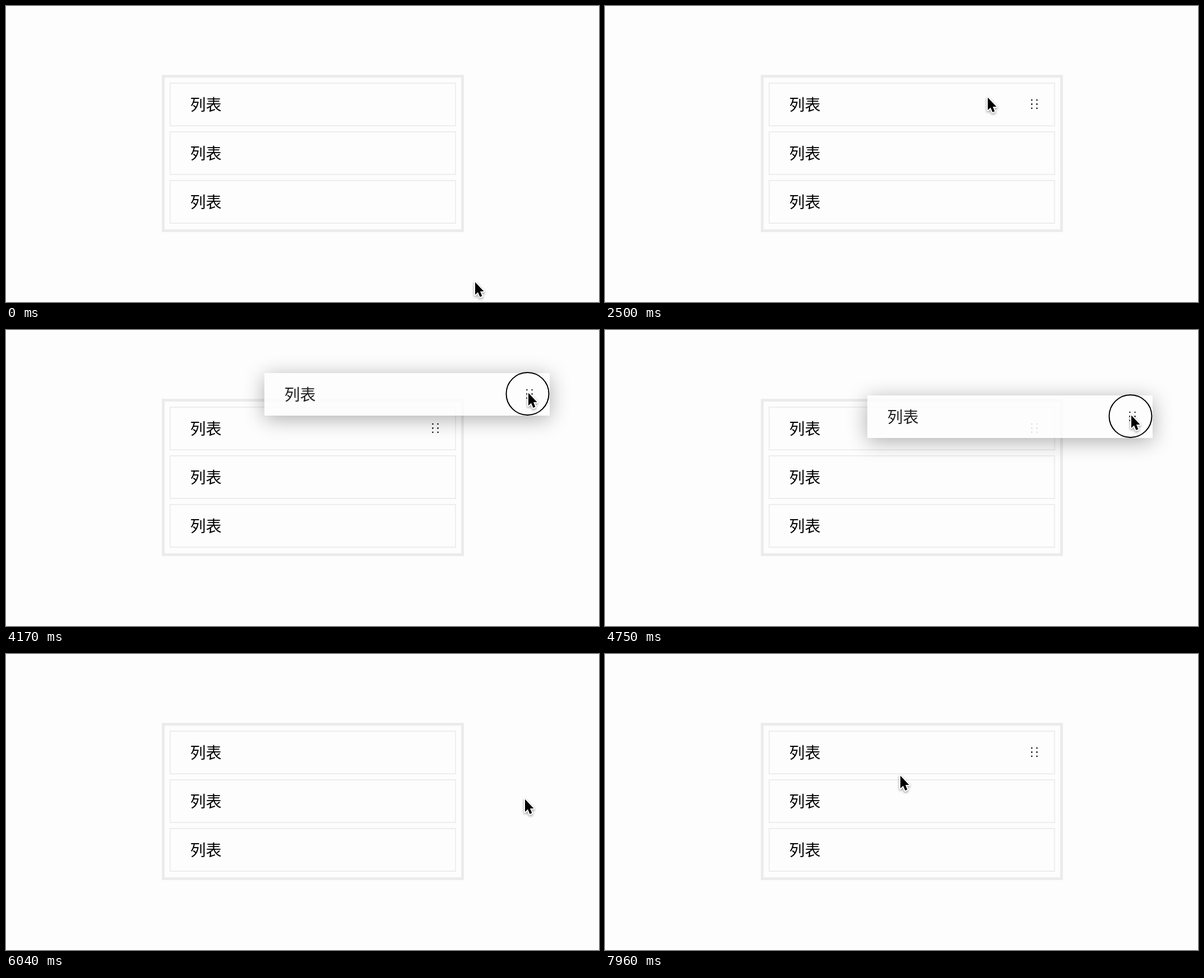
An HTML page with a canvas for the animation above (8 s loop, 1058 by 529 pixels).

```html
<!DOCTYPE html>
<html lang="zh">
<head>
<meta charset="utf-8">
<title>列表</title>
<style>
html, body { margin: 0; width: 100%; height: 100%; overflow: hidden; background: #fdfdfd; }
canvas { display: block; }
</style>
</head>
<body>
<canvas id="stage" width="1058" height="529"></canvas>
<script>
const ctx = document.getElementById('stage').getContext('2d');
const LOOP = 8000;
const ROW = { x: 292, y: 137, w: 511, h: 78, step: 87 };
const PRESS = 2900, LIFT = 3400, DROP = 5400, HOME = 5820, LEAVE = 5900;

const clamp = v => Math.min(1, Math.max(0, v));
const span = (t, a, b) => clamp((t - a) / (b - a));
const ease = u => u * u * (3 - 2 * u);

// An eased move to a point, curved when a control point is given
const move = (from, till, to, bend) => ({ from, till, to, bend });

function follow(start, moves, t) {
  let p = start;
  for (const { from, till, to, bend = [0, 1].map(k => (p[k] + to[k]) / 2) } of moves) {
    if (t < from) break;
    const u = ease(span(t, from, till)), v = 1 - u;
    const next = p.map((a, k) => a * v * v + 2 * u * v * bend[k] + to[k] * u * u);
    if (t < till) return next;
    p = to;
  }
  return p;
}

const approach = [
  move(680, 1670, [622, 219], [655, 430]),
  move(1880, 2880, [764, 173], [612, 139])
];
const carry = [
  move(LIFT, 4170, [168, -61], [60, 230]),
  move(4170, 4750, [175, -21], [172, -105]),
  move(4750, 5250, [162, 82], [170, 20]),
  move(DROP, HOME, [0, 0])
];
const wander = [
  move(6080, 6540, [690, 264]),
  move(6680, 7600, [549, 130], [600, 190]),
  move(7600, 7750, [534, 177]),
  move(7880, 7960, [527, 217])
];

const cardAt = t => follow([0, 0], carry, t);

function cursorAt(t) {
  if (t < LIFT) return follow([837, 493], approach, t);
  if (t >= DROP) return follow([926, 259], wander, t);
  const [x, y] = cardAt(t), slip = 4 * ease(span(t, 4750, 5250));
  return [x + 764, y + 173 + slip];
}

function hoverRow(t, [x, y]) {
  if (t >= LIFT && t < LEAVE) return 0;
  if (x < 292 || x > 803 || y < 123 || y > 392) return -1;
  return Math.max(0, Math.floor((y - 131) / ROW.step));
}

function frame(x, y, w, h, line) {
  ctx.strokeStyle = '#ebebeb';
  ctx.lineWidth = line;
  ctx.strokeRect(x + line / 2, y + line / 2, w - line, h - line);
}

function label(x, y) {
  ctx.fillStyle = '#000';
  ctx.font = '28px "Noto Sans CJK SC", "Noto Sans CJK", "Noto Sans CJK JP", sans-serif';
  ctx.fillText('列表', x + 36.5, y + 50);
}

function handle(x, y) {
  ctx.fillStyle = '#000';
  for (let i = 0; i < 6; i++) {
    ctx.beginPath();
    ctx.arc(x + 469.4 + (i % 2) * 9.2, y + 31 + (i >> 1) * 7.4, 1.3, 0, 7);
    ctx.fill();
  }
}

function card([dx, dy]) {
  const x = 293 + dx, y = 138 + dy, w = 509, h = 76;
  // Shadow only outside, so the rows show faintly through the card
  ctx.save();
  ctx.beginPath();
  ctx.rect(0, 0, 1058, 529);
  ctx.rect(x, y, w, h);
  ctx.clip('evenodd');
  ctx.shadowColor = 'rgba(0,0,0,.32)';
  ctx.shadowBlur = 36;
  ctx.shadowOffsetY = 6;
  ctx.fillStyle = '#000';
  ctx.fillRect(x, y, w, h);
  ctx.restore();
  ctx.save();
  ctx.globalAlpha = 0.88;
  ctx.fillStyle = '#fdfdfd';
  ctx.fillRect(x, y, w, h);
  label(x - 1, y - 1);
  handle(x - 1, y - 1);
  ctx.restore();
}

function ring(t, [x, y]) {
  const grow = span(t, PRESS, PRESS + 300), leave = span(t, DROP, DROP + 280);
  ctx.save();
  ctx.globalAlpha = clamp(grow * 1.5) * (1 - leave);
  ctx.strokeStyle = '#000';
  ctx.lineWidth = 2;
  ctx.beginPath();
  ctx.arc(x - 1.5, y + 2, 38 + 18 * ((1 - grow) ** 2 + leave ** 2), 0, 7);
  ctx.stroke();
  ctx.restore();
}

const arrow = new Path2D('M0 0V22.6L5 18L8.6 26.4L12.4 24.8L9 16.6H15.6Z');

function pointer([x, y]) {
  ctx.save();
  ctx.translate(x, y + 0.5);
  ctx.lineJoin = 'round';
  ctx.strokeStyle = '#fff';
  ctx.lineWidth = 4;
  ctx.shadowColor = 'rgba(0,0,0,.4)';
  ctx.shadowBlur = 4;
  ctx.shadowOffsetY = 2;
  ctx.stroke(arrow);
  ctx.shadowColor = 'transparent';
  ctx.fillStyle = '#000';
  ctx.fill(arrow);
  ctx.restore();
}

function draw(t) {
  const tip = cursorAt(t), active = hoverRow(t, tip);
  ctx.fillStyle = '#fdfdfd';
  ctx.fillRect(0, 0, 1058, 529);
  frame(278, 123, 539, 281, 5);
  for (let i = 0; i < 3; i++) {
    const y = ROW.y + i * ROW.step;
    frame(ROW.x, y, ROW.w, ROW.h, 1.7);
    label(ROW.x, y);
    if (i === active) handle(ROW.x, y);
  }
  if (t >= LIFT && t < HOME) card(cardAt(t));
  if (t >= PRESS && t < DROP + 280) ring(t, tip);
  pointer(tip);
}

const begin = performance.now();
function tick() {
  draw((performance.now() - begin) % LOOP);
  requestAnimationFrame(tick);
}
tick();
</script>
</body>
</html>
```
